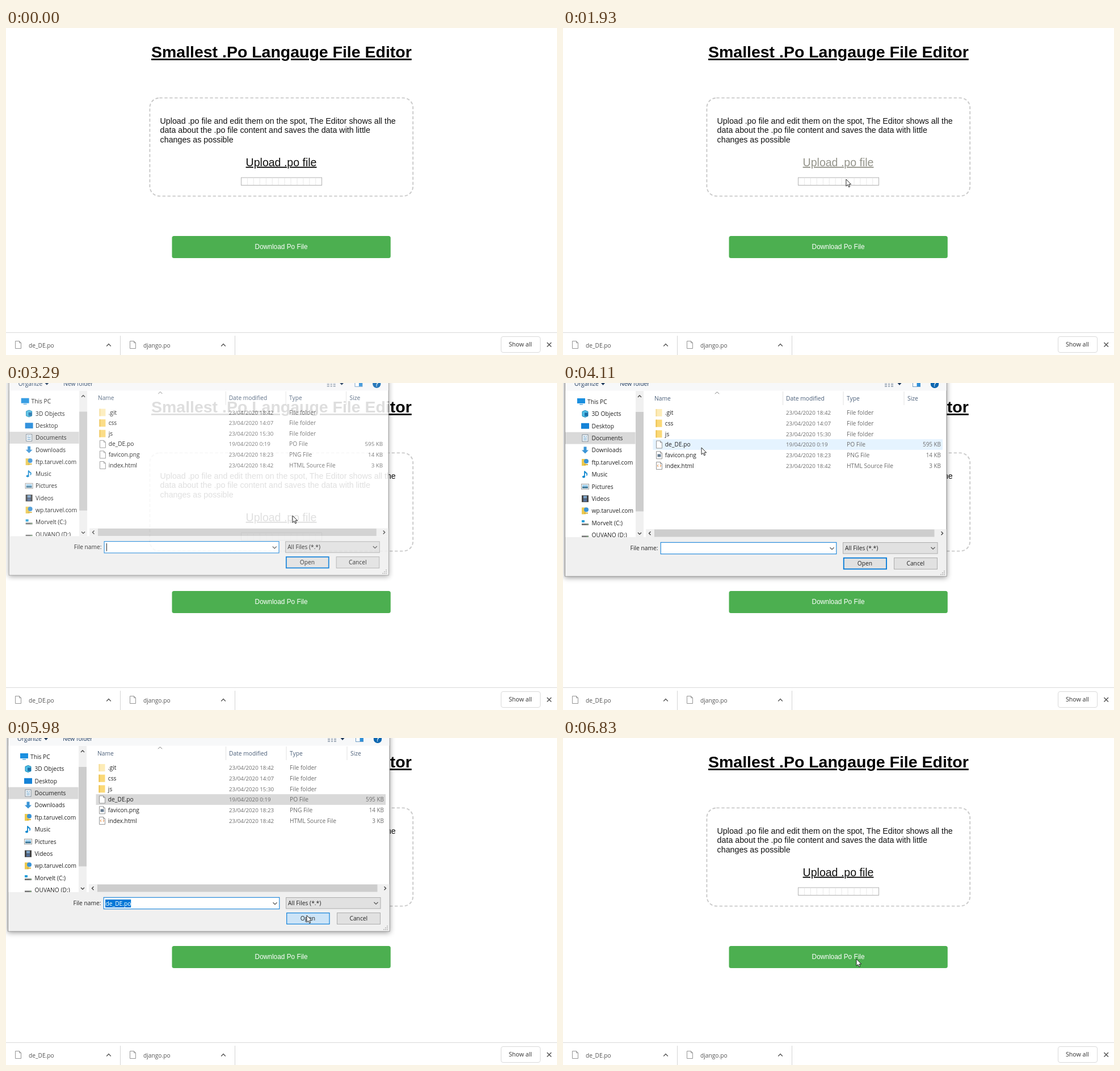
Write an HTML page that moves like this. It is 971x577 px and loops after 8 s.

```html
<!DOCTYPE html>
<html lang="en">
<head>
<meta charset="utf-8">
<title>Po file editor</title>
<style>
html, body { margin: 0; width: 100%; height: 100%; overflow: hidden; background: #fff; }
svg { display: block; }
text { white-space: pre; font: 10.25px "Open Sans", "Noto Sans", sans-serif; }
.page text { font-family: "Liberation Sans", Arial, sans-serif; }
</style>
</head>
<body>
<svg id="stage" width="971" height="577" viewBox="0 0 971 577"></svg>
<script>
const LOOP = 8000;
const BLUE = '#0078d7';

// SVG helpers
const rect = (x, y, w, h, fill, more = '') =>
  `<rect x="${x}" y="${y}" width="${w}" height="${h}" fill="${fill}" ${more}/>`;
const path = (d, stroke, width = 1, fill = 'none') =>
  `<path d="${d}" fill="${fill}" stroke="${stroke}" stroke-width="${width}"/>`;
const text = (x, y, s, fill = '#222', style = '', more = '') =>
  `<text x="${x}" y="${y}" fill="${fill}" style="${style}" ${more}>${s}</text>`;
const chevron = (x, y, dir, color = '#555', r = 3.5, width = 1.2) =>
  path(`M${x - r} ${y - dir * r / 2}l${r} ${dir * r}l${r} ${-dir * r}`, color, width);
const sideChevron = (x, y, dir) => path(`M${x - dir * 1.5} ${y - 3}l${dir * 3} 3l${-dir * 3} 3`, '#444', 1.4);
const sheet = (x, y, w = 10, h = 13) =>
  path(`M${x} ${y}h${w - 3}l3 3v${h - 3}h${-w}zM${x + w - 3} ${y}v3h3`, '#8a8a8a', 0.9, '#fff');

function page() {
  const ticks = Array.from({ length: 12 }, (_, i) => `M${(425.4 + i * 10.95).toFixed(1)} 264.5v12.5`).join('');
  const lines = ['Upload .po file and edit them on the spot, The Editor shows all the',
    'data about the .po file content and saves the data with little',
    'changes as possible'];
  return `<g class="page">
    ${text(256, 52, 'Smallest .Po Langauge File Editor', '#000', 'font-size:28.48px;font-weight:700;text-decoration:underline')}
    ${rect(253.4, 123.4, 463.8, 173.2, 'none', 'rx="17" stroke="#c9c9c9" stroke-width="1.9" stroke-dasharray="5.3 3.6"')}
    ${lines.map((s, i) => text(271.6, 168.8 + i * 16.4, s, '#111', 'font-size:14.24px')).join('')}
    ${text(422.6, 243.8, 'Upload .po file', '#111', 'font-size:19.55px;text-decoration:underline', 'id="link"')}
    ${rect(414.5, 264, 142, 13.5, '#fff', 'stroke="#b2b2b2"')}
    ${path(ticks, '#e8e8e8')}
    ${rect(292.5, 367, 385.3, 39, '#4caf50', 'rx="3.5"')}
    ${text(438.6, 390.4, 'Download Po File', '#fff', 'font-size:11.87px')}
  </g>`;
}

function shelf() {
  const item = (x, name) => sheet(x + 16.5, 552.5) +
    text(x + 40, 563.5, name, '#555', 'font-size:10.2px') + chevron(x + 181, 559.5, -1, '#555', 3.8, 1.4);
  return path('M0 537.5H971', '#d9d9d9') + path('M201.5 543V577M403.5 543V577', '#d5d5d5') +
    item(0, 'de_DE.po') + item(202, 'django.po') +
    rect(872.5, 544.5, 69, 28, '#fff', 'rx="3.5" stroke="#dadada"') +
    text(886, 562.3, 'Show all', '#333', 'font-size:10.6px;font-weight:500') +
    path('M953.5 555l7.5 7.5m0-7.5l-7.5 7.5', '#555', 1.5);
}

// Sidebar icons, drawn in a 14 by 14 cell
const screen = rect(0, 1, 14, 9, '#1a8fe0') + rect(4, 11, 6, 1.5, '#5aa9dc');
const globe = rect(1, 1, 7, 12, '#ecc94f') + '<circle cx="9" cy="5" r="4" fill="#3b93d6"/>' + rect(5, 10, 7, 2, '#d8b13c');
const disk = rect(1, 8, 12, 3, '#777') + rect(10, 9, 2, 1, '#7ee07e');
const places = [
  ['This PC', screen],
  ['3D Objects', path('M2 3l5-2 5 2v8l-5 2-5-2z', '#1686b5', 1, '#4fc0e8') + rect(6, 5, 6, 6, '#1c6fa8')],
  ['Desktop', rect(0, 2, 14, 10, '#1583d8')],
  ['Documents', rect(2, 1, 10, 12, '#fff', 'stroke="#7b8b99"') + path('M4 4h3M8 4h2M4 7h6M4 10h6', '#3d84b8')],
  ['Downloads', path('M4.5 1h5v6H13L7 13 1 7H4.5z', 'none', 0, '#3a94d6')],
  ['ftp.taruvel.com', globe],
  ['Music', path('M6 11V1q1 3 4 4 1 2-.5 4', '#1489d0', 1.8) + '<ellipse cx="4.5" cy="11" rx="2.5" ry="2" fill="#1489d0"/>'],
  ['Pictures', rect(.5, 2.5, 13, 9, '#fff', 'stroke="#999"') + rect(2, 4, 10, 3, '#9fd0f0') + rect(2, 7, 10, 3, '#3f7898')],
  ['Videos', rect(1, 1, 12, 12, '#444') + rect(4, 2, 6, 4.5, '#7ba3c8') + rect(4, 7.5, 6, 4.5, '#526f9b')],
  ['wp.taruvel.com', globe],
  ['Morvelt (C:)', disk + rect(1, 2, 5, 4, '#26a0da')],
  ['QUVANO (D:)', disk],
];

const ROW_TOP = 43.1, ROW_H = 18.7;
const files = [
  ['.git', '23/04/2020 18:42', 'File folder', ''],
  ['css', '23/04/2020 14:07', 'File folder', ''],
  ['js', '23/04/2020 15:30', 'File folder', ''],
  ['de_DE.po', '19/04/2020 0:19', 'PO File', '595 KB'],
  ['favicon.png', '23/04/2020 18:23', 'PNG File', '14 KB'],
  ['index.html', '23/04/2020 18:42', 'HTML Source File', '3 KB'],
];

function sidebar() {
  return `<svg x="4" y="14" width="123.5" height="258" viewBox="4 14 123.5 258">` +
    rect(4, 86.7, 124, 21, '#d9d9d9') +
    places.map(([name, icon], i) => {
      const x = i ? 32 : 25, y = 33 + i * 21.4;
      return `<g transform="translate(${x} ${y - 7})">${icon}</g>` + text(x + (i ? 18.5 : 18), y + 3.8, name);
    }).join('') + '</svg>' +
    rect(128, 14, 14, 258, '#f0f0f0') + rect(128, 51, 14, 175.5, '#cdcdcd') +
    chevron(135, 23.5, -1, '#444', 3, 1.4) + chevron(135, 265.5, 1, '#444', 3, 1.4);
}

function fileRow([name, date, type, size], i) {
  const y = ROW_TOP + (i + .5) * ROW_H, gray = '#6d6d6d';
  const icon = i < 3
    ? rect(163.5, y - 6.5, 11, 13, i ? '#fbd977' : '#fdecb8') + rect(163.5, y - 6.5, 2, 13, i ? '#edc253' : '#f5dc98')
    : sheet(164.5, y - 6.5);
  return icon + text(179.8, y + 3.7, name) +
    text(393, y + 3.7, date, gray, 'font-size:9.75px') + text(500, y + 3.7, type, gray) +
    text(666, y + 3.7, size, gray, 'font-size:9.9px', 'text-anchor="end"');
}

function dialog() {
  const heads = [[161, 'Name'], [393, 'Date modified'], [500, 'Type'], [607, 'Size']];
  const grip = [[672, 332], [672, 335], [672, 338], [669, 335], [669, 338], [666, 338]];
  return `<g id="dialog">
    ${rect(3.5, -60, 672.5, 401, '#fff', 'stroke="#8c8c8c" style="filter:drop-shadow(0 2px 5px #0006)"')}
    ${rect(4, -60, 671.5, 73.5, '#f7f8f9')}
    ${text(20, 5, 'Organize', '#1e395b')}${path('M67 0h7l-3.5 4z', 'none', 0, '#1e395b')}
    ${text(100, 5, 'New folder', '#1e395b')}
    ${path('M567 0h4m2 0h3m2 0h4M567 3h4m2 0h3m2 0h4M567 6h4m2 0h3m2 0h4', '#8a97a6', 1.4)}
    ${path('M589.5 0h7l-3.5 4z', 'none', 0, '#1e395b')}
    ${rect(616.5, -4, 13, 10.5, '#fff', 'stroke="#6f9cc4"')}${rect(623.5, -3, 6, 9, '#2f8fd8')}
    <circle cx="655" cy="1.8" r="7.2" fill="#0b66b0"/>
    ${text(652.6, 5.8, '?', '#fff', 'font-weight:700')}
    ${sidebar()}
    ${path('M387.5 15v24M494 15v24M601 15v24', '#e2e2e2')}
    ${chevron(271.5, 17.5, -1, '#777', 3.5, 1)}
    ${heads.map(([x, s]) => text(x, 30.6, s, '#4c607a')).join('')}
    ${rect(158.5, 0, 510.5, ROW_H, '#e5f3ff', 'id="hover"')}
    ${rect(159, ROW_TOP + 3 * ROW_H + .5, 509.5, ROW_H - 1, '#cce8ff', 'id="picked"')}
    ${files.map(fileRow).join('')}
    <g id="details">${rect(166.5, 125.5, 6, 5, '#6a7f94')}${path('M168 144l-1.8 2 1.8 2m3-4l1.8 2-1.8 2', '#e07b2a')}</g>
    ${rect(146, 258, 529.5, 14, '#f0f0f0')}${rect(161, 258.5, 493.5, 13, '#cdcdcd')}
    ${sideChevron(153, 265.2, -1)}${sideChevron(668, 265.2, 1)}
    ${rect(4, 272, 671.5, 68.5, '#f0f0f0')}
    ${text(167.5, 295.2, 'File name:', '#222', '', 'text-anchor="end"')}
    ${rect(172.2, 281.3, 309.6, 20.4, '#fff', 'id="field"')}
    ${rect(175, 285, 45.2, 14, BLUE, 'id="mark"')}
    ${text(175.5, 295.6, 'de_DE.po', '#222', '', 'id="fileName"')}
    ${path('M176.5 284.5v14', '#000').replace('<path', '<path id="caret"')}
    ${chevron(474, 292, 1)}
    ${rect(493.5, 281.5, 166.5, 19.5, '#e1e1e1', 'stroke="#adadad"')}
    ${text(497, 295.2, 'All Files (*.*)')}${chevron(652, 291.5, 1)}
    ${rect(494.7, 308.7, 75.3, 19.6, '#e1e1e1', `id="open" stroke="${BLUE}"`)}
    ${text(532, 321.8, 'Open', '#222', '', 'text-anchor="middle"')}
    ${rect(583.5, 308.5, 76, 20, '#e1e1e1', 'stroke="#adadad"')}
    ${text(621.3, 321.8, 'Cancel', '#222', '', 'text-anchor="middle"')}
    ${grip.map(([x, y]) => rect(x - 1, y - 1, 1.8, 1.8, '#b8b8b8')).join('')}
  </g>`;
}

const cursor = '<path id="cursor" d="M0 0V12.2L2.9 9.6 4.8 13.9 6.7 13.1 4.9 8.9H8.7Z" fill="#fff" stroke="#111" stroke-width=".9"/>';
document.getElementById('stage').innerHTML = page() + shelf() + dialog() + cursor;

const el = {};
for (const node of document.querySelectorAll('[id]')) el[node.id] = node;
const set = (id, attrs) => { for (const k in attrs) el[id].setAttribute(k, attrs[k]); };
const show = (id, on) => { el[id].style.display = on ? '' : 'none'; };

// Tracks: [time, ...values], linear between keys
const moves = [[70, 850, 547], [360, 699, 435], [590, 699, 435], [1000, 590, 310], [1310, 538, 240],
  [1640, 538, 240], [1800, 505, 265], [1930, 499, 267], [2100, 477, 250], [2230, 492, 220], [2330, 513, 229],
  [2640, 513, 229], [3130, 505, 234], [3370, 505, 234], [3820, 300, 145], [4000, 300, 145],
  [4110, 244, 114], [4360, 248, 109], [4600, 248, 110], [4810, 254, 121], [5270, 300, 122],
  [5430, 540, 42], [5580, 676, 120], [5800, 570, 295], [5900, 530, 313], [6370, 530, 313], [6830, 517, 390]];
const linkTone = [[1100, 17], [1460, 148], [2420, 148], [2500, 17]];
const dialogPose = [[3100, 0, .93], [3290, .87, .9945], [3370, 1, 1], [6070, 1, 1], [6130, .7, .99], [6300, 0, .95]];

function at(keys, t) {
  const i = keys.findIndex(k => k[0] > t);
  if (i === 0) return keys[0].slice(1);
  if (i < 0) return keys[keys.length - 1].slice(1);
  const a = keys[i - 1], b = keys[i], p = (t - a[0]) / (b[0] - a[0]);
  return a.slice(1).map((v, n) => v + (b[n + 1] - v) * p);
}

function draw(t) {
  const [x, y] = at(moves, t);
  show('cursor', t >= 70);
  set('cursor', { transform: `translate(${x} ${y})` });

  const [tone] = at(linkTone, t).map(Math.round);
  set('link', { fill: `rgb(${tone},${tone},${tone - tone / 18 | 0})` });

  const [opacity, scale] = at(dialogPose, t);
  show('dialog', opacity > 0);
  set('dialog', { opacity, transform: `translate(338 -30) scale(${scale}) translate(-338 30)` });

  const picked = t >= 4500, pressed = t >= 5900;
  const row = Math.floor((y - ROW_TOP) / ROW_H);
  show('hover', t > 3370 && row >= 0 && row < files.length && x > 158 && x < 669 && !(picked && row === 3));
  set('hover', { y: ROW_TOP + row * ROW_H });
  show('picked', picked);
  set('picked', { fill: pressed ? '#d9d9d9' : '#cce8ff', stroke: pressed ? '#d9d9d9' : '#99d1ff' });
  show('details', t >= 3370);

  set('field', { stroke: picked && !pressed ? '#7a7a7a' : BLUE });
  show('caret', !picked && (t < 3780 || t >= 4310));
  show('fileName', picked);
  show('mark', pressed);
  set('fileName', { fill: pressed ? '#fff' : '#222' });

  const overOpen = x > 494 && x < 571 && y > 308 && y < 329;
  set('open', { fill: pressed ? '#cce4f7' : overOpen ? '#e5f1fb' : '#e1e1e1', 'stroke-width': pressed ? 1.1 : 1.8 });
}

function tick() {
  draw(performance.now() % LOOP);
  requestAnimationFrame(tick);
}
tick();
</script>
</body>
</html>
```
